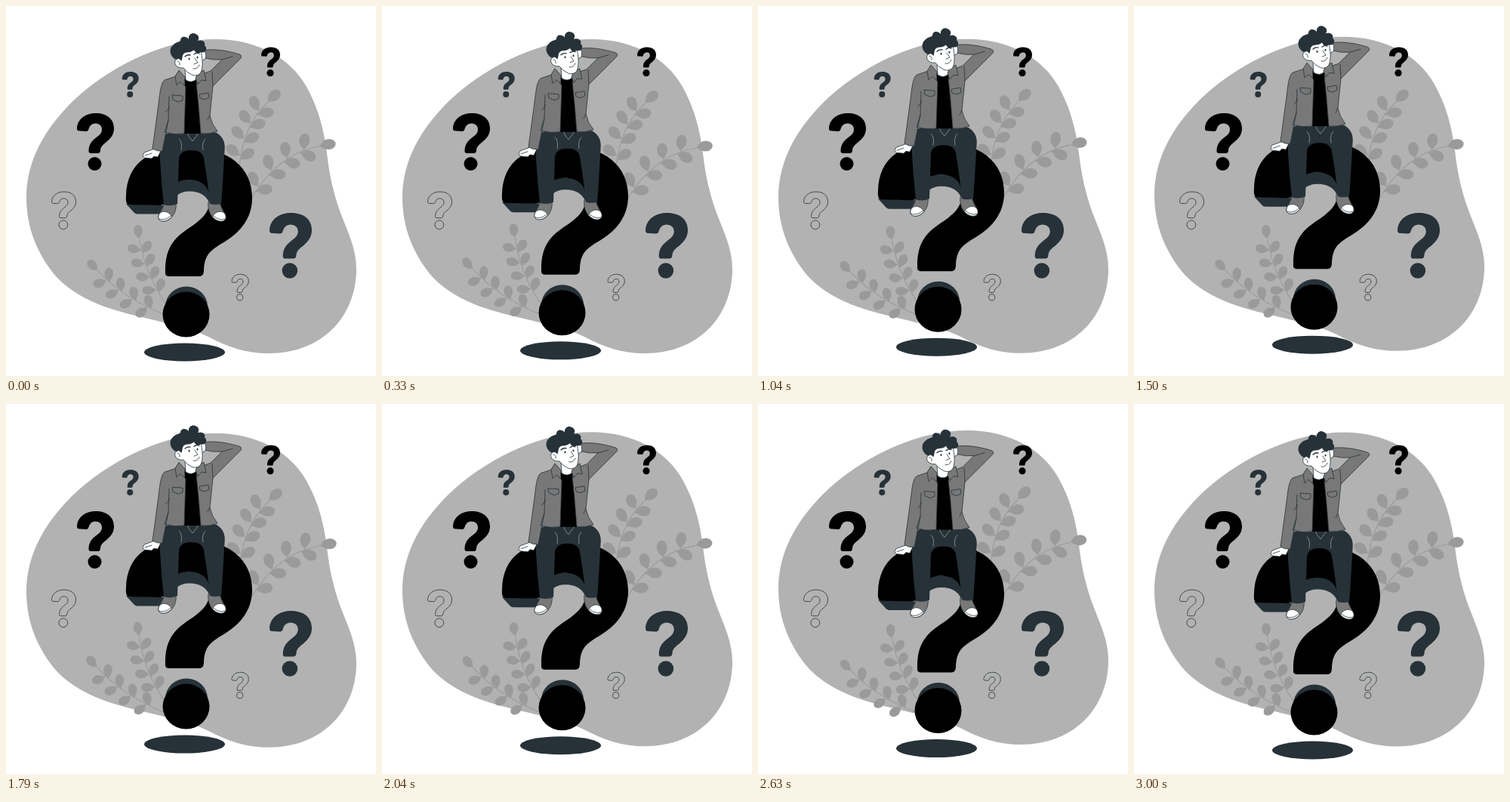
An HTML page that plays this animation: 490x490 px, repeating every 3.04 s.

```html
<!DOCTYPE html>
<html lang="en">
<head>
<meta charset="utf-8">
<title>Floating question</title>
<style>
  html, body { margin: 0; width: 100%; height: 100%; overflow: hidden; background: #fff; }
  svg { display: block; width: 100%; height: 100%; }
  .dark { fill: #263238; }
  .line { fill: none; stroke: #263238; stroke-width: .8; stroke-linecap: round; stroke-linejoin: round; }
  .cloth { fill: #787878; stroke: #263238; stroke-width: .8; stroke-linejoin: round; }
  .skin { fill: #fff; stroke: #263238; stroke-width: .8; stroke-linejoin: round; }
  .seam { fill: none; stroke: #b8bec0; stroke-width: .6; stroke-linecap: round; }
  .hollow { fill: none; stroke: #263238; stroke-width: .8; }
  #plants { fill: #9a9a9a; }
  #plants .stem { fill: none; stroke: #9a9a9a; stroke-width: 1.1; }
</style>
</head>
<body>
<svg viewBox="0 0 490 490">
  <defs>
    <g id="mark">
      <path vector-effect="non-scaling-stroke" d="M0 19.500C1 7 12 0 25 0C40 0 49 8 49 20C49 28 45 33 39 38C34 42 31.500 44 31 49C30.800 52 29.500 53 27.500 53H18.500C16.500 53 15.500 52 15.500 50C15.500 42 19 37 25 32.500C30 29 33 26 33 21.500C33 16.500 29.500 13.500 24.500 13.500C19.500 13.500 16.500 17 15.500 21C15 23 14 24 12 24L2 23.300C.5 23.200-.2 21.500 0 19.500Z"/>
      <circle vector-effect="non-scaling-stroke" cx="23.500" cy="67" r="9"/>
    </g>
    <g id="shoe">
      <path class="cloth" d="M210 259H225C226 268 224 274 220 279C215 286 204 287 202 281C201 275 208 270 210 259Z"/>
      <path class="skin" d="M204 274C209 270 217 273 219.500 279C214 286.500 203 287 202 281C201.500 278 202.500 276 204 274Z"/>
      <path class="line" d="M203 282C208 284 214 282 218 278"/>
    </g>
  </defs>

  <path id="blob" fill="#b2b2b2" d="M278 44C332 44 377 69 398 107C415 138 421 165 425 195C428 222 433 246 443 274C453 300 464 322 464 348C464 412 418 460 348 460C318 460 294 452 268 438C240 424 205 419 163 408C125 398 92 385 67 359C42 330 27 294 27 254C27 203 53 159 95 120C146 75 213 44 278 44Z"/>
  <g id="plants"></g>
  <g id="marks"></g>

  <g id="floating">
    <ellipse class="dark" cx="236.500" cy="458.500" rx="53.500" ry="12"/>
    <ellipse class="dark" cx="239" cy="398" rx="28" ry="26.500"/>
    <ellipse cx="238.500" cy="408.500" rx="31" ry="30"/>
    <path class="dark" d="M208 264L210 230H272V268C268 252 258 245.500 243 245.500C229 245.500 220 252 216 275.500L175 275.500Q172 275.500 170 274L159 262Z"/>
    <path d="M159 251C160 208 191 187 240 187C295 187 326 214 326 254C326 283 308 302 285 315C268 325 263 332 262 350C262 355 260 358 256 358H216C212 358 210.500 356 211 351C211 326 218 311 238 297C258 284 270 274 270 256C270 240 260 230 242 230C226 230 216 239 212 256C210 262 208 264 203 264L163 263C159 262.500 158.500 258 159 251Z"/>

    <use href="#shoe"/>
    <use href="#shoe" transform="matrix(-1 0 0 1 493 0)"/>
    <path class="dark" d="M212 169C224 166 268 165 279 168C287 173 291 180 289.500 192C288 215 287 240 285 262Q277 264 270 262C268 240 265 220 262 202C261 194 254 191 245.500 191C237 191 230 194 229 202L227 262Q218 266 209 263C206 235 204 210 203.500 189C203 180 206 173 212 169Z"/>
    <path class="seam" d="M240 168Q242 174 247 179Q252 173 255 168M229 176Q234 180 232 191M264 176Q259 180 261 191"/>

    <path class="skin" d="M183 194L197 189L205 192L201 200L196 199L193 202L183 201L181 198Z"/>
    <path class="line" d="M184 198L193 195"/>
    <path d="M237 96L253 94L255 130L258 169H235L237 130Z"/>
    <path class="skin" d="M237 84L253 87L252 97Q246 103 238 98Z"/>
    <path class="cloth" d="M225 93L210 98C205 102 204 114 202 130L194 189Q200 193 207 192L215 151L210 167Q222 171 236 169L238 108L229 88Z"/>
    <path class="line" d="M216 120L215 151M217 133L212 140"/>
    <path class="cloth" d="M252 103L257 91L271 86L286 71Q275 72 264 69L261 59C274 56 293 59 309 64Q314 66 310 70L274 106L270 145Q272 156 280 166Q270 170 258 169L255 132Z"/>
    <path class="line" d="M274 106L273 87M286 71L300 67M270 145L267 151"/>
    <path class="cloth" d="M229 85L237 94L236 105L231 100L226 105L224 93ZM254 89L262 85L265 99L259 98L254 104L251 96Z"/>
    <path class="cloth" d="M220 118L234 119V125L228 127L221 124ZM256 117L268 115L269 121L263 124L257 122Z"/>

    <path class="skin" d="M253 59L262 58Q266 62 264 70L258 73Z"/>
    <path class="skin" d="M228 60Q243 56 258 59C260 68 261 78 259 85C258 91 252 93 247 91.500Q239 88 235 82C226 83 221 76 225 71Q228 68 232 71Z"/>
    <path class="dark" d="M225 71C217 67 215 57 221 52C224 48 229 48 231 46C231 40 238 39 242 44C241 39 246 34 251 37C256 39 256 43 254 46C260 44 265 48 263 52C268 57 264 63 258 61C255 64 250 62 249 58C245 62 240 61 237 62C232 65 235 68 232 73Q229 67 225 71Z"/>
    <path class="line" d="M227 73Q231 74 230 78M250 69L254 75L249 77M248 83Q254 84 256 78"/>
    <path class="line" style="stroke-width:1.300" d="M237 67Q240 64 244 65M249 64Q253 61 256 63"/>
    <ellipse class="dark" cx="242.500" cy="70" rx="1" ry="1.500"/>
    <ellipse class="dark" cx="253.500" cy="68" rx="1" ry="1.500"/>
  </g>
</svg>
<script>
  const byId = id => document.getElementById(id);

  function add(parent, tag, attrs) {
    const node = document.createElementNS("http://www.w3.org/2000/svg", tag);
    for (const key in attrs) node.setAttribute(key, attrs[key]);
    parent.appendChild(node);
  }

  // x, y, width and look of each small question mark
  const marks = [
    [94, 142, 49, ""], [349, 274, 56, "dark"], [153.7, 87, 22, "dark"],
    [338, 54.5, 25, ""], [60.5, 246, 32, "hollow"], [299, 355.3, 22.3, "hollow"]
  ];
  for (const [x, y, width, look] of marks) {
    add(byId("marks"), "use", {
      href: "#mark", class: look, transform: `translate(${x} ${y}) scale(${width / 49})`
    });
  }

  const leaf = "M0 0C4-.5 5-7 13-7.200C19-7.200 22.500-4 23 0C22 5 18 7 13 6.500C7 6 5 1 0 0Z";
  const mix = (a, b, t) => a + (b - a) * t;

  // Point and direction on a quadratic stem
  function along([ax, ay, bx, by, cx, cy], t) {
    return {
      x: mix(mix(ax, bx, t), mix(bx, cx, t), t),
      y: mix(mix(ay, by, t), mix(by, cy, t), t),
      angle: Math.atan2(mix(by - ay, cy - by, t), mix(bx - ax, cx - bx, t)) * 180 / Math.PI
    };
  }

  function plant(stem, pairs, size) {
    const root = byId("plants");
    const [ax, ay, ...rest] = stem;
    add(root, "path", { class: "stem", d: `M${ax} ${ay}Q${rest}` });
    const addLeaf = (t, turn) => {
      const { x, y, angle } = along(stem, t);
      add(root, "path", { d: leaf, transform: `translate(${x} ${y}) rotate(${angle + turn}) scale(${size})` });
    };
    for (let i = 0; i < pairs; i++) {
      const t = mix(0.24, 0.84, i / (pairs - 1));
      addLeaf(t, -65);
      addLeaf(t - 0.05, 45);
    }
    addLeaf(1, 0);
  }

  plant([308, 228, 310, 162, 346, 128], 4, 0.98);
  plant([316, 272, 351, 198, 414, 186], 4, 1);
  plant([212, 395, 184, 355, 177, 309], 4, 0.84);
  plant([214, 410, 156, 388, 122, 351], 4, 0.84);

  const loop = 3040;
  const rise = t => 9.8 * (1 - Math.abs(1 - 2 * (t % 3000) / 3000));

  function sway(t) {
    const p = t % 1500 / 1500;
    return p < 0.25 ? 4 * p : p < 0.75 ? 2 - 4 * p : 4 * p - 4;
  }

  function draw(time) {
    // The motion advances at 24 steps a second
    const t = Math.floor(time % loop * 0.024 + 0.15) * 1000 / 24;
    byId("floating").setAttribute("transform", `translate(0 ${-rise(t)})`);
    byId("blob").setAttribute("transform", `translate(0 ${-rise(Math.max(0, t - 1000))})`);
    byId("plants").setAttribute("transform", `rotate(${sway(t)} 273 263)`);
  }

  const start = performance.now();
  function tick() {
    draw(performance.now() - start);
    requestAnimationFrame(tick);
  }
  tick();
</script>
</body>
</html>
```
